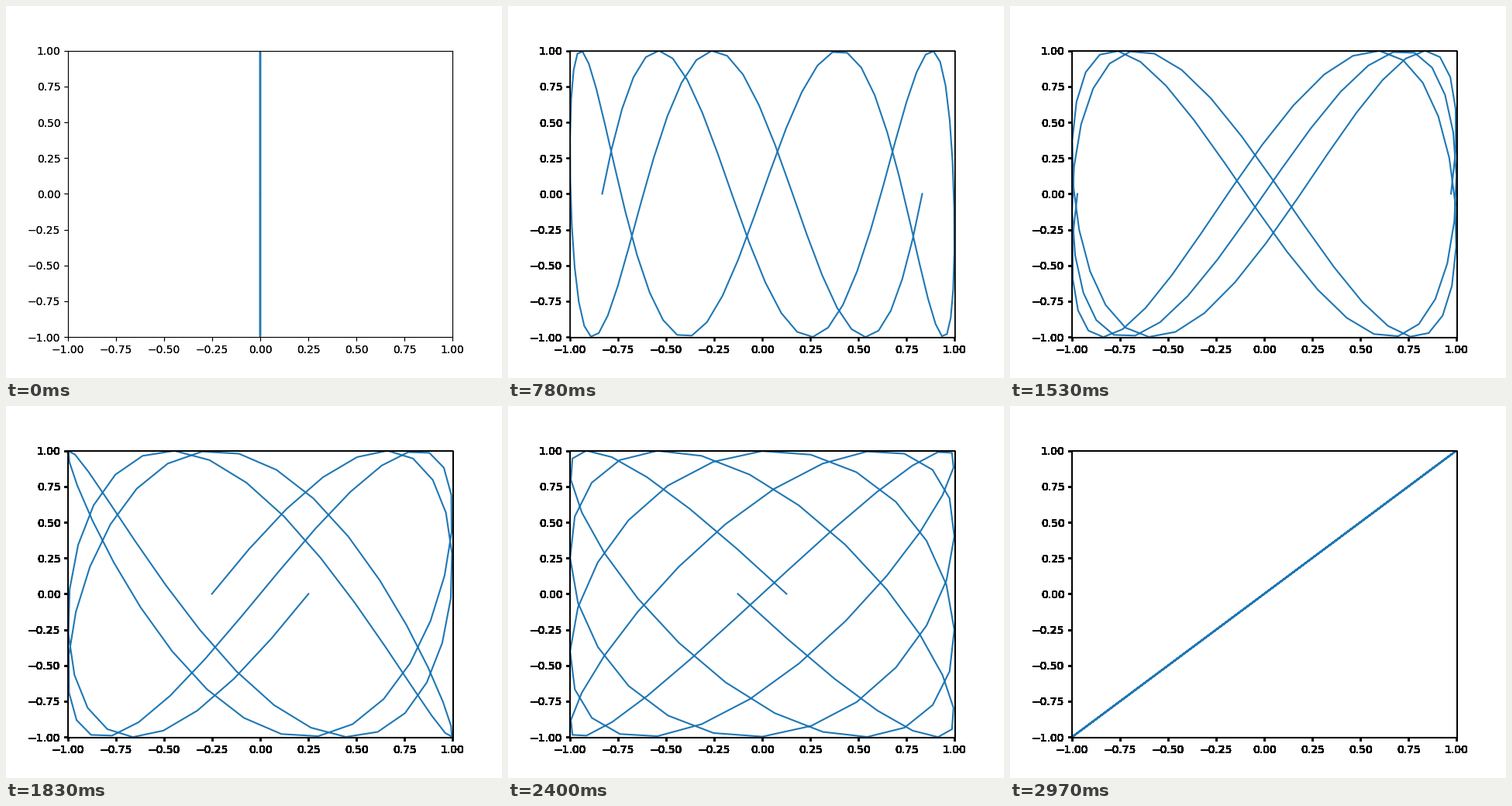
These frames come from a looping animation (640 by 480 pixels, 3 s). A matplotlib script:

```python
import numpy as np
import matplotlib.pyplot as plt
from matplotlib.animation import FuncAnimation

FRAMES = 100
INTERVAL = 30
CYCLES = 5

fig = plt.figure(figsize=(6.4, 4.8), dpi=100)
ax = fig.add_axes([0.125, 0.11, 0.775, 0.77], xlim=(-1, 1), ylim=(-1, 1))
line, = ax.plot([], [], color="#1f77b4", lw=1.5)


def ink_outside_axes():
    """Coverage of black ink outside the plot area, 0 to 1 per pixel."""
    fig.canvas.draw()
    ink = 1 - np.asarray(fig.canvas.buffer_rgba())[..., 0] / 255
    height = ink.shape[0]
    box = ax.get_window_extent()
    left, right = int(box.x0 + 0.5), int(box.x1 + 0.5)
    top, bottom = int(height - box.y1 + 0.5), int(height - box.y0 + 0.5)
    ink[top:bottom, left:right] = 0
    return ink


ink = ink_outside_axes()
overlay = np.zeros(ink.shape + (4,))
stack = fig.figimage(overlay, zorder=5)

t = np.linspace(-np.pi, np.pi, 100)
freqs = np.linspace(0, CYCLES, FRAMES)


def update(i):
    line.set_data(np.sin(freqs[i] * t), np.sin(CYCLES * t))
    # labels and frame are inked over once more at every step
    overlay[..., 3] = 1 - (1 - ink) ** (i + 1)
    stack.set_data((overlay * 255).round().astype(np.uint8))
    return line, stack


anim = FuncAnimation(fig, update, frames=FRAMES, interval=INTERVAL,
                     repeat=True, repeat_delay=0, blit=False)
plt.show()
```
